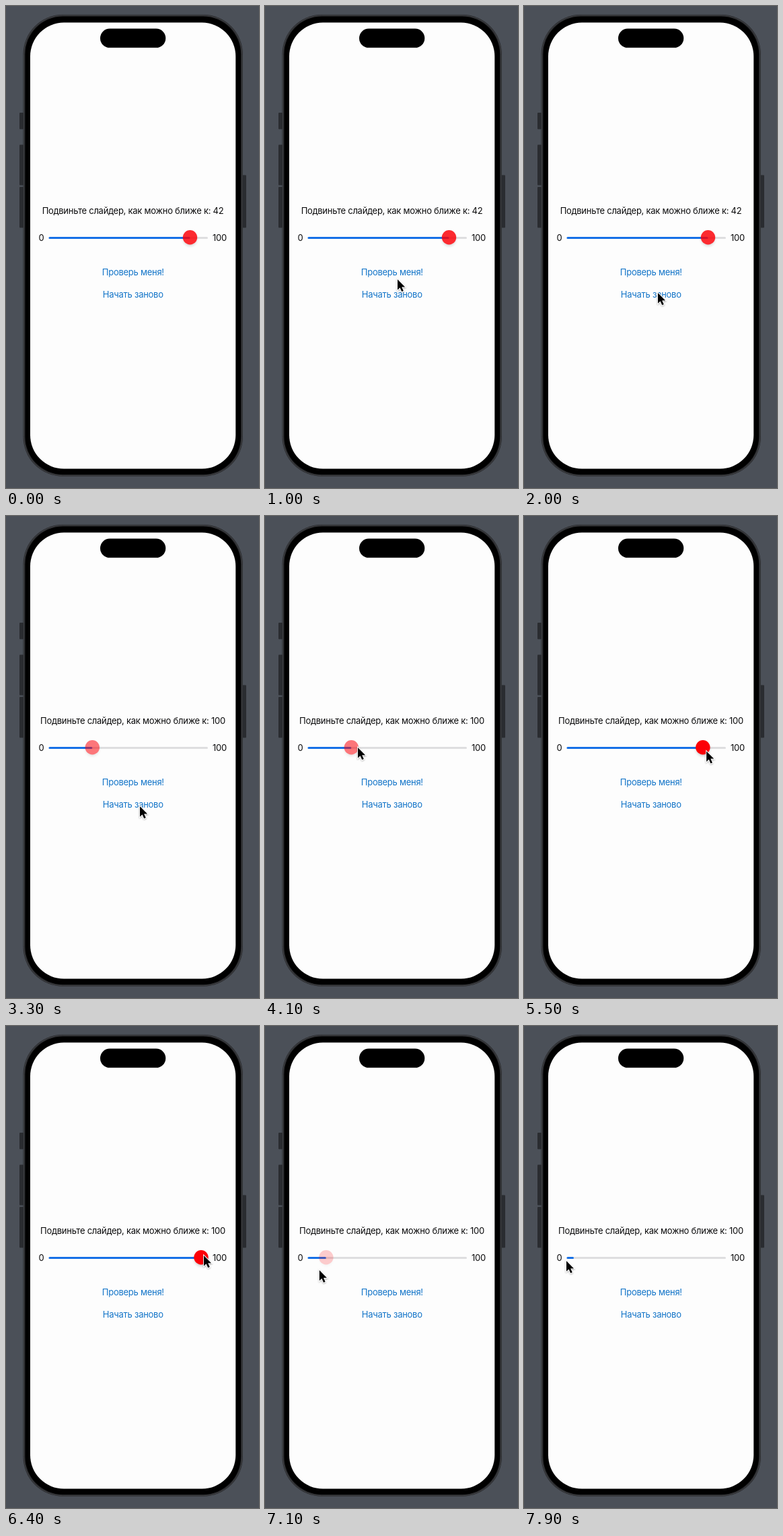
An HTML page for the animation above (8 s loop, 376 by 714 pixels).

```html
<!DOCTYPE html>
<html lang="ru">
<head>
<meta charset="utf-8">
<title>Слайдер</title>
<style>
  html, body { margin: 0; width: 100%; height: 100%; overflow: hidden; background: #4b5058; }
  svg { display: block; width: 376px; height: 714px; }
  text { font: 13px Inter, "Open Sans", sans-serif; letter-spacing: -0.26px; fill: #0b0b0c; }
  .mid { text-anchor: middle; }
  .link { fill: #1274c8; }
</style>
</head>
<body>
<svg viewBox="0 0 376 714">
  <defs>
    <filter id="soft" x="-50%" y="-50%" width="200%" height="200%">
      <feGaussianBlur stdDeviation="2.2"/>
    </filter>
    <filter id="drop" x="-50%" y="-50%" width="200%" height="200%">
      <feDropShadow dx="0" dy="1" stdDeviation="1" flood-opacity=".35"/>
    </filter>
  </defs>

  <rect width="376" height="714" fill="#4b5058"/>
  <g fill="#2a2c30">
    <rect x="20" y="158" width="6" height="24.500" rx="1"/>
    <rect x="20" y="205.500" width="6" height="60" rx="1"/>
    <rect x="20" y="268" width="6" height="60.500" rx="1"/>
    <rect x="351" y="250.500" width="6" height="78" rx="1"/>
  </g>
  <rect x="25.500" y="12.800" width="326.500" height="684" rx="59" fill="#27282b"/>
  <rect x="26.500" y="13.800" width="324.500" height="682" rx="58" fill="none" stroke="#414245"/>
  <rect x="28.500" y="15.500" width="320.500" height="678.500" rx="56" fill="#000"/>
  <rect x="36" y="24.600" width="305.300" height="660.900" rx="50" fill="#fdfdfd"/>
  <rect x="140" y="33.500" width="97.300" height="28.300" rx="14.150" fill="#000"/>

  <text id="task" class="mid" x="188.500" y="307.500"></text>
  <text x="48.500" y="348">0</text>
  <text x="307" y="348">100</text>
  <text class="mid link" x="188.800" y="398.500">Проверь меня!</text>
  <text id="again" class="mid link" x="188.800" y="432">Начать заново</text>

  <rect x="63.500" y="341.900" width="236.500" height="3.100" rx="1.550" fill="#dedee0"/>
  <rect id="fill" x="63.500" y="341.900" height="3.100" rx="1.550" fill="#1670e6"/>
  <g id="thumb">
    <circle cy="345.500" r="10" opacity=".2" filter="url(#soft)"/>
    <circle cy="342.700" r="10.700" fill="#fc0007"/>
  </g>

  <path id="cursor" d="M0 0V15.500L3.600 12.200L6.200 18.100L8.800 17L6.200 11.200H11.100Z"
        fill="#000" stroke="#fff" stroke-width="1.800" paint-order="stroke" filter="url(#drop)"/>
</svg>
<script>
  const LOOP = 8000, STEP = 100;
  const MIN_X = 74, MAX_X = 290;
  const PRESS = 2600, RESET = 2800, DRAG = 4900, LAG = 28;

  // Pointer moves; between them it rests. "arc" bends the path into a loop.
  const moves = [
    { from: 300, to: 1000, x: 196, y: 404 },
    { from: 1100, to: 2000, x: 198, y: 424, arc: 15 },
    { from: PRESS, to: 3300, x: 198, y: 429 },
    { from: 3500, to: 4100, x: 137, y: 342 },
    { from: 4500, to: 4700, x: 130, y: 341 },
    { from: DRAG, to: 5000, x: 170, y: 332 },
    { from: 5000, to: 5800, x: 300, y: 352 },
    { from: 5800, to: 6400, x: 293, y: 339 },
    { from: 6700, to: 7300, x: 29, y: 366 },
    { from: 7500, to: 7900, x: 62, y: 347 }
  ];

  const [task, again, fill, thumb, cursor] =
    ["task", "again", "fill", "thumb", "cursor"].map(id => document.getElementById(id));

  const clamp = (v, lo, hi) => Math.min(hi, Math.max(lo, v));
  const ease = p => 1 - Math.pow(1 - p, 1.5);

  function pointer(t) {
    let x = 13, y = 661;
    for (const m of moves) {
      if (t <= m.from) break;
      const p = clamp((t - m.from) / (m.to - m.from), 0, 1);
      const arc = m.arc || 0;
      x += (m.x - x) * ease(p) + arc * Math.sin(2 * Math.PI * p);
      y += (m.y - y) * ease(p) - arc * Math.sin(Math.PI * p);
    }
    return { x, y };
  }

  function thumbX(t) {
    if (t < RESET) return 273.5;
    if (t <= DRAG) return 128.3;
    return clamp(pointer(t - LAG).x, MIN_X, MAX_X);
  }

  function draw(t) {
    const goal = t < RESET ? 42 : 100;
    const x = thumbX(t);
    const value = (x - MIN_X) / (MAX_X - MIN_X) * 100;
    const near = 1 - Math.abs(goal - value) / 100;
    task.textContent = "Подвиньте слайдер, как можно ближе к: " + goal;
    fill.setAttribute("width", x - 63.5);
    thumb.setAttribute("transform", `translate(${x} 0)`);
    thumb.setAttribute("opacity", 1 - Math.pow(1 - near, 2.6));
    again.setAttribute("opacity", t < PRESS ? 1 : clamp(0.3 + (t - RESET) / 400, 0.3, 1));
    const tip = pointer(t);
    cursor.setAttribute("transform", `translate(${tip.x + 1} ${tip.y + 1})`);
    cursor.setAttribute("visibility", t < 300 ? "hidden" : "visible");
  }

  const start = performance.now();
  function tick() {
    const t = (performance.now() - start) % LOOP;
    draw(Math.floor(t / STEP) * STEP);
    requestAnimationFrame(tick);
  }
  tick();
</script>
</body>
</html>
```
